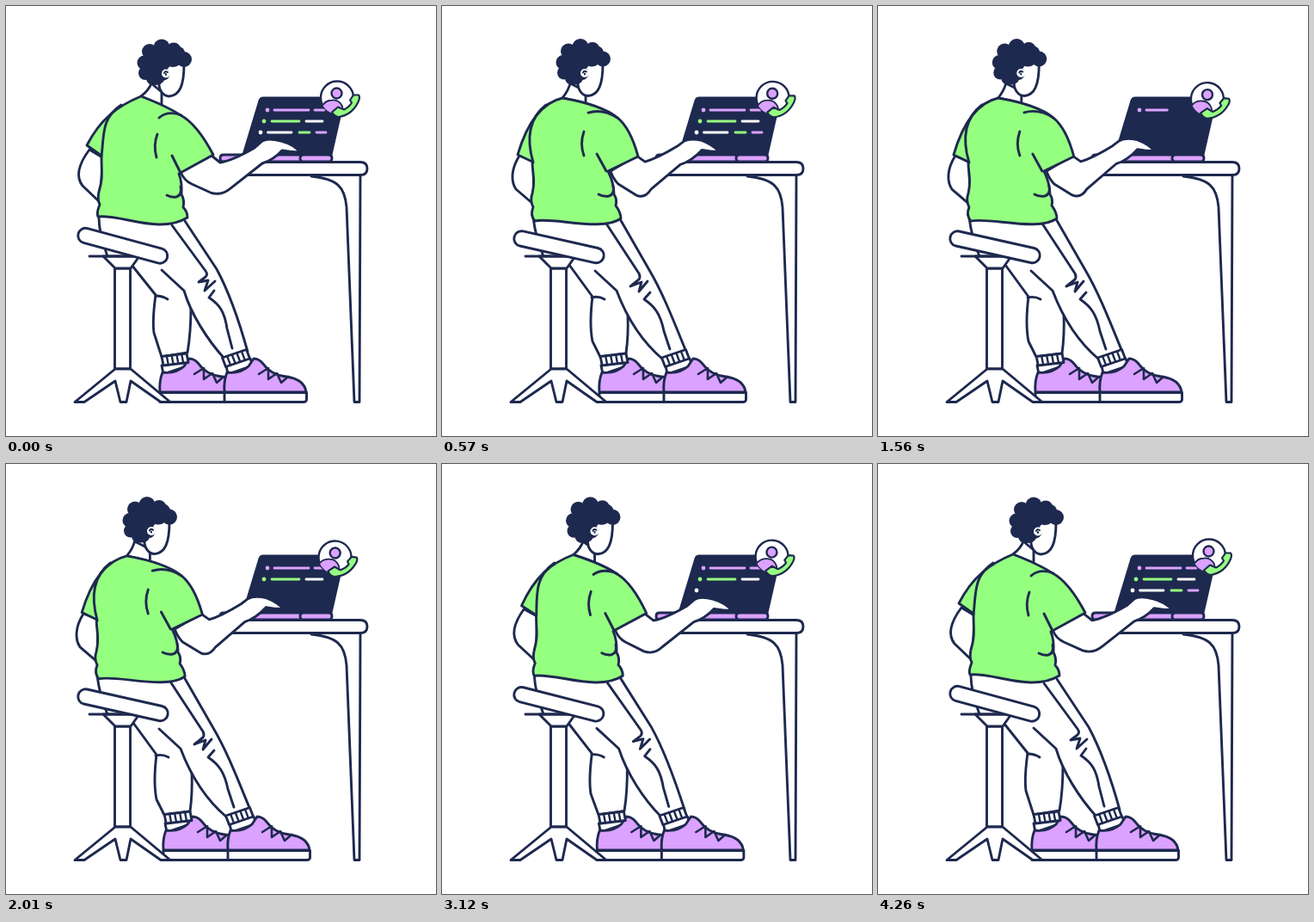
An HTML page with a canvas for the animation above (4.29 s loop, 500 px wide and 500 px high).

```html
<!DOCTYPE html>
<html lang="en">
<head>
<meta charset="utf-8">
<title>Working at a laptop</title>
<style>
html, body { margin: 0; width: 100%; height: 100%; overflow: hidden; background: #fff; }
canvas { display: block; }
</style>
</head>
<body>
<canvas id="stage" width="500" height="500"></canvas>
<script>
const LOOP = 4290;
const NAVY = '#1e294f', GREEN = '#95ff80', PURPLE = '#dba2ff', WHITE = '#fff';
const c = document.getElementById('stage').getContext('2d');

const clamp = v => Math.min(1, Math.max(0, v));
const smooth = v => v * v * (3 - 2 * v);
const ramp = (t, from, to) => clamp((t - from) / (to - from));

// Eased value between [time, value] keys
function track(t, keys) {
  let value = keys[0][1];
  for (let i = 1; i < keys.length; i++) {
    value += (keys[i][1] - keys[i - 1][1]) * smooth(ramp(t, keys[i - 1][0], keys[i][0]));
  }
  return value;
}

// Blend two paths that share the same commands
function blend(a, b, k) {
  const ends = b.match(/-?[\d.]+/g);
  let i = 0;
  return a.replace(/-?[\d.]+/g, v => +v + (ends[i++] - v) * k);
}

function shape(d, fill, line = NAVY, width = 2.9) {
  const p = new Path2D(d);
  if (fill) { c.fillStyle = fill; c.fill(p); }
  if (line) { c.strokeStyle = line; c.lineWidth = width; c.stroke(p); }
}

function dot(x, y, r, fill, line) {
  c.beginPath();
  c.arc(x, y, r, 0, 7);
  c.fillStyle = fill;
  c.fill();
  if (line) { c.strokeStyle = line; c.lineWidth = 2.4; c.stroke(); }
}

function group(x, y, angle, draw) {
  c.save();
  c.translate(x, y);
  c.rotate(angle);
  draw();
  c.restore();
}

function table() {
  shape('M355 198C385 201 394 210 396 234L405 460.5H411L412 197', WHITE);
  shape('M256 181.5H412Q420 181.5 420 189T412 196.5H256Z', WHITE);
}

// Each code line: dot colour, then [start, end, colour] bars
const CODE = [
  [PURPLE, [312, 352, PURPLE], [359, 370, PURPLE]],
  [GREEN, [309, 341, GREEN], [349, 368, WHITE]],
  [WHITE, [304.5, 332, WHITE], [341, 353, GREEN], [361, 372, PURPLE]]
];

function codeLine(i, lift, shown) {
  if (shown <= 0) return;
  const y = 121 + 13 * i - lift, shift = lift * 4 / 13;
  const [color, ...bars] = CODE[i];
  dot(304 - 4 * i + shift, y, 2.4, color);
  const reach = 300 + 75 * shown;
  for (const [from, to, ink] of bars) {
    const end = Math.min(to, reach);
    if (end > from) shape(`M${from + shift} ${y}H${end + shift}`, null, ink, 2.8);
  }
}

function laptop(t) {
  const screen = 'M276 173L295 110Q296 107 299 107H393L378 173Z';
  shape(screen, NAVY);
  c.save();
  c.clip(new Path2D(screen));
  const lift = 42 * smooth(ramp(t, 780, 1480));
  if (lift < 42) CODE.forEach((_, i) => codeLine(i, lift, 1));
  codeLine(0, 0, ramp(t, 1430, 1700));
  codeLine(1, 0, ramp(t, 1700, 1980));
  codeLine(2, 0, t < 2500 ? 0 : Math.max(.01, ramp(t, 3550, 4180)));
  c.restore();
  shape('M253 173H345V181H253Q249 181 249 177T253 173Z', PURPLE);
  shape('M346 173H375Q379 173 379 177T375 181H346Q342 181 342 177T346 173Z', PURPLE);
}

function callIcon(t) {
  const k = (1 - Math.cos(2 * Math.PI * t / LOOP)) / 2;
  group(385 - 2.5 * k, 106.5 + 2 * k, .13 * k, () => {
    dot(0, 0, 19, WHITE, NAVY);
    c.save();
    c.beginPath();
    c.arc(0, 0, 19, 0, 7);
    c.clip();
    shape('M-18 11Q-14 3 -6 3Q2 2 6 10L8 21H-16Z', PURPLE, NAVY, 1.8);
    c.restore();
    dot(-.5, -5, 6, PURPLE, NAVY);
    shape('M19 -3L25 -3Q27 -1 25 4Q18 20 2 22.5Q-3 22 -6 17L1 11L8 14Q14 11 17 6L15 3Z', GREEN, NAVY, 2.2);
  });
}

function cuff(x1, y1, x2, y2, dx, dy) {
  shape(`M${x1} ${y1}L${x2} ${y2}l${dx} ${dy}L${x1 + dx} ${y1 + dy}Z`, WHITE);
  for (let i = 1; i < 5; i++) {
    shape(`M${x1 + (x2 - x1) * i / 5} ${y1 + (y2 - y1) * i / 5}l${dx} ${dy}`, null, NAVY, 2.4);
  }
}

function shoe(x) {
  group(x, 0, 0, () => {
    shape('M2 418L4 428L33 418L30 410', WHITE);
    shape('M3 426Q18 428 28 419L34 410Q40 410 45 416Q54 429 72 431Q93 434 95 449H0Q-1 436 3 426Z', PURPLE);
    shape('M0 449.5H95.5V458Q95 460.5 92 460.5H0Z', WHITE);
    shape('M40 428L51 421L51 434L61 427L66 438L74 431', null, NAVY, 2.6);
  });
}

function legs(k) {
  const step = 4 * k;
  shape(blend('M146 301L174 336Q170 365 172 380L181 408L211 403Q215 380 215 350',
              'M148 301L175 338Q171 370 175 390L184 408L214 404Q217 382 216 358', k), WHITE);
  shape(blend('M174 337Q182 337 188 341', 'M174 339Q182 337 189 341', k));
  shoe(179 + step);
  cuff(181 + .8 * step, 407.5, 210 + step, 404, 2, 10.5);
  shoe(254 + step);
  // White area hides the far leg without adding an outline
  shape(blend('M109 246L113 285L181 307L207 331C215 358 234 388 254 410L281 402C271 366 259 332 245 306L208 250Z',
              'M107 246L113 285L178 307L203 331C214 360 232 390 257 411L284 402C270 368 257 334 241 307L206 246Z', k), WHITE, null);
  shape(blend('M181 307L207 331C215 358 234 388 254 410M208 250L245 306C259 332 271 366 281 402',
              'M178 308L203 331C214 360 232 390 257 411M206 246L241 307C257 334 270 368 284 402', k));
  shape(blend('M108 246Q108 264 118 291', 'M106 246Q109 270 118 291', k));
  shape(blend('M193 255L232 308Q235 312 232 315L224 321L235 319L231 331L243 320M242 331L236 339C248 347 254 355 257 375L263 398',
              'M191 253L229 311Q231 315 229 318L219 326L232 321L229 332L239 320M242 333L235 341C247 349 254 358 258 378L265 399', k));
  cuff(251.5 + step, 409, 279.5 + step, 399.5, 4, 10.5);
}

function stool(k) {
  shape('M126.5 305V422H144.5V305Z', WHITE);
  shape('M113 291H155L145 305H127Z', WHITE);
  shape('M97 291H155');
  shape('M127 422L80 460.5H91L127 436L133 460.5H140L145 436L180 460.5H191L145 422Z', WHITE);
  const seat = blend('M92.5 267L179 290.5', 'M92.5 270.5L179.5 290', k);
  shape(seat, null, NAVY, 20.4);
  shape(seat, null, WHITE, 14.6);
}

function rightArm(k, t) {
  c.save();
  c.translate(205, 190);
  c.rotate(.005 * Math.sin(2 * Math.PI * t * 10 / LOOP));
  c.translate(-205, -190);
  shape(blend('M203 193Q207 203 216 207L238 217Q250 221 261 212L298 183Q311 179 321 168Q332 170 342 170Q335 161 320 157Q304 153 298 157L289 165Q263 180 249 182L239 174Z',
              'M196 192Q199 201 205 207L226 220Q236 224 243 213L277 184Q290 180 302 167Q312 169 322 169Q315 161 302 156Q288 153 281 157L273 163Q250 177 236 181L226 174Z', k), WHITE);
  c.restore();
}

function torso(k, t) {
  shape(blend('M97 167C82 187 82 200 89 209L110 229L112 176Z',
              'M90 174C80 190 80 204 86 213L107 231L106 180Z', k), WHITE);
  rightArm(k, t);
  // Neck
  shape(blend('M169 90Q166 98 157 105L181 115V100Z', 'M149 90Q147 98 140 107L167 113V99Z', k), WHITE);
  shape(blend('M157 105C130 116 110 131 94 162L111 174C111 194 113 199 108 216Q106 225 109 231Q105 240 107 245C135 242 178 266 211 246Q211 239 206 234Q208 226 204 219Q205 205 201 195L241 173Q222 137 203 127Q188 117 157 105Z',
              'M140 107C118 112 100 132 88 173L105 181C105 197 109 200 105 218Q102 226 106 234Q102 243 108 250C128 245 187 263 208 247Q208 240 202 232Q204 225 200 219Q200 206 193 192L228 175Q219 142 204 130Q186 115 140 107Z', k), GREEN);
  shape(blend('M134 115C111 130 114 150 111 175', 'M121 115C99 132 99 158 106 182', k));
  shape(blend('M178 130Q188 121 204 127', 'M170 124Q187 119 204 130', k));
  shape(blend('M176 149Q171 162 175 176', 'M165 146Q160 160 165 174', k));
  shape(blend('M193 174L203 194', 'M180 172L191 192', k));
  shape(blend('M187 220Q192 223 198 222Q205 220 203 210', 'M182 219Q187 222 194 221Q201 219 199 209', k));
}

const CURLS = [
  [181, 48, 9.5], [167, 53, 9], [195, 51, 8.5], [207, 62, 9], [161, 66, 8.5], [162, 78, 8],
  [171, 84, 8], [177, 63, 15], [175, 82, 10], [194, 60, 11], [200, 55, 8], [183, 79, 7.5]
];

function head(k) {
  group(-20 * k, -.5 * k, 0, () => {
    shape('M179 84C175 98 184 105 190 105C202 104 207 92 207 68L180 60Z', WHITE);
    for (const [x, y, r] of CURLS) dot(x, y, r, NAVY);
    dot(186, 78.5, 5, WHITE);
    shape('M184 78Q185 75 188 77M186 80V79', null, NAVY, 2);
  });
}

function draw(t) {
  const body = track(t, [[10, 0], [590, 1], [1170, 1.05], [2010, .97], [2750, 1], [3300, 0]]);
  const nod = track(t, [[10, 0], [570, 1], [1170, 1.1], [2010, .85], [2780, 1], [3400, 0]]);
  const foot = track(t, [[10, 0], [600, 1], [2800, 1], [3330, 0]]);
  c.fillStyle = WHITE;
  c.fillRect(0, 0, 500, 500);
  table();
  laptop(t);
  callIcon(t);
  legs(foot);
  stool(foot);
  torso(body, t);
  head(nod);
}

c.lineCap = c.lineJoin = 'round';
const start = performance.now();
function frame() {
  draw((performance.now() - start) % LOOP);
  requestAnimationFrame(frame);
}
frame();
</script>
</body>
</html>
```
